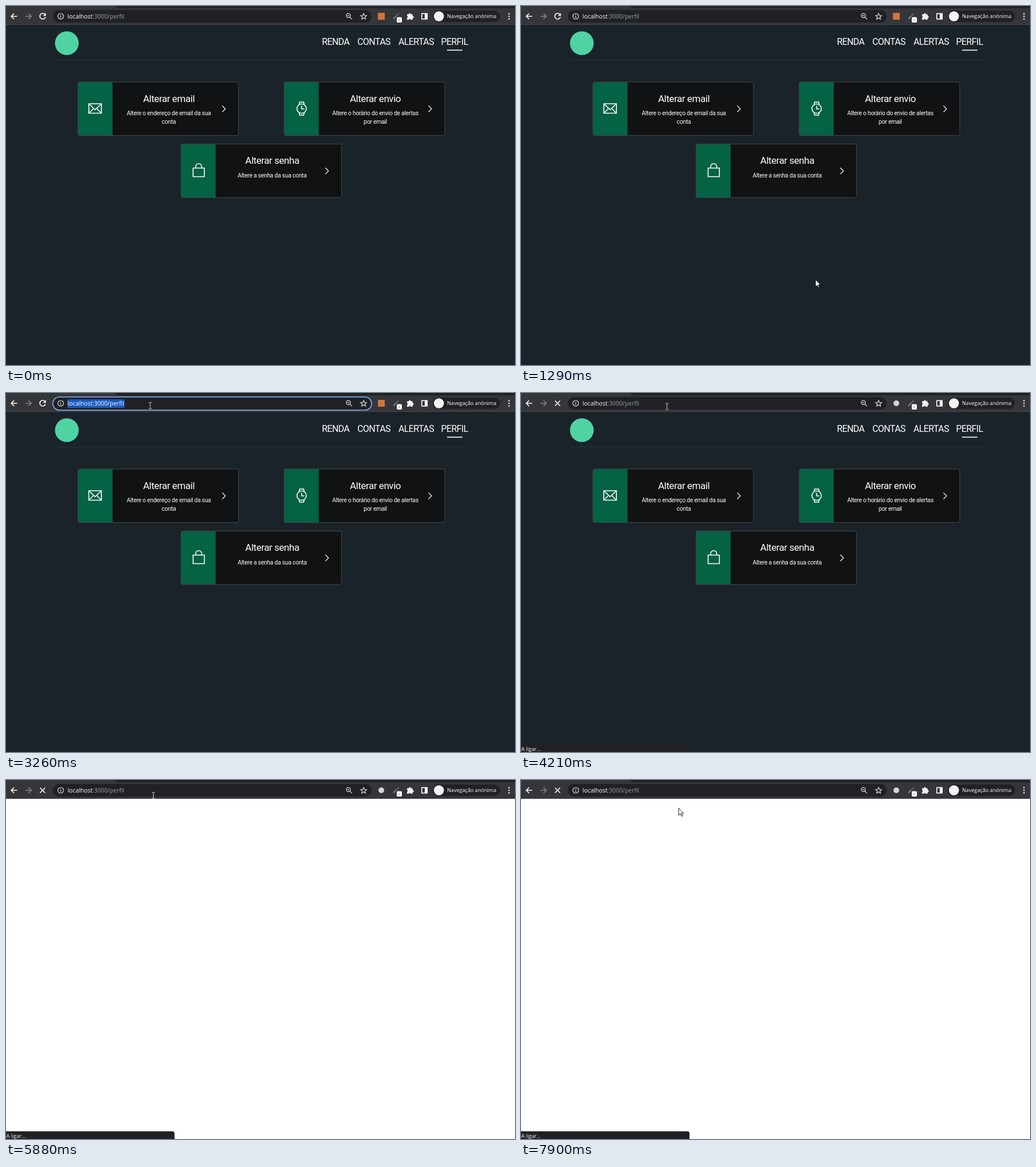
An HTML page for the animation above (8 s loop, 891 by 628 pixels).

```html
<!DOCTYPE html>
<html lang="pt">
<head>
<meta charset="utf-8">
<title>Perfil</title>
<style>
html, body { margin: 0; width: 100%; height: 100%; overflow: hidden; background: #1b232a; }
svg { display: block; width: 891px; height: 628px; }
.line { fill: none; stroke: #fff; stroke-width: 1.6; }
.tool { fill: none; stroke: #dfe1e5; stroke-width: 1.2; }
.ui { font-family: "Open Sans", "Noto Sans", sans-serif; fill: #fff; }
.url { font-size: 10.4px; }
.page { font-family: Roboto, sans-serif; fill: #fff; }
.nav { font-size: 16px; letter-spacing: -.6px; }
.head { font-size: 17px; letter-spacing: -.44px; text-anchor: middle; }
.desc { font-size: 10.4px; letter-spacing: -.27px; text-anchor: middle; }

/* Every animation shares the 8 s clock. */
.anim { animation: 8s step-end infinite; }
.idle { animation-name: idle; }
.loading { animation-name: loading; }
.ring { animation-name: ring; }
.selected { animation-name: selected; }
.ext-a { animation-name: extA; }
.ext-b { animation-name: extB; }
.blank { animation-name: blank; }
.pointer { animation-name: move; }
.arrow { animation-name: arrow; }
.beam { animation-name: beam; }
@keyframes idle { 0% { opacity: 1 } 46.75%, 100% { opacity: 0 } }
@keyframes loading { 0% { opacity: 0 } 46.75%, 100% { opacity: 1 } }
@keyframes ring { 0% { opacity: 0 } 29% { opacity: 1 } 46.75%, 100% { opacity: 0 } }
@keyframes selected { 0% { opacity: 0 } 30.625% { opacity: 1 } 46.75%, 100% { opacity: 0 } }
@keyframes extA { 0% { opacity: 1 } 52.625%, 100% { opacity: 0 } }
@keyframes extB { 0% { opacity: 0 } 52.625%, 100% { opacity: 1 } }
@keyframes blank { 0% { opacity: 0 } 60.25%, 100% { opacity: 1 } }
@keyframes arrow {
  0% { opacity: 0 } 7.625% { opacity: 1 } 20.5% { opacity: 0 }
  74.3125%, 100% { opacity: 1 }
}
@keyframes beam { 0% { opacity: 0 } 20.5% { opacity: 1 } 74.3125%, 100% { opacity: 0 } }
@keyframes move {
  0% { transform: translate(885px, 590px) }
  7.625% { transform: translate(885px, 590px); animation-timing-function: steps(10) }
  16.125% { transform: translate(515px, 478px) }
  17% { transform: translate(448px, 358px) }
  17.875% { transform: translate(395px, 250px) }
  18.75% { transform: translate(350px, 150px) }
  19.625% { transform: translate(318px, 75px) }
  20.5% { transform: translate(292px, 26px); animation-timing-function: steps(6) }
  25.75% { transform: translate(251.5px, 22px) }
  40.75% { transform: translate(252.5px, 22px) }
  41.625% { transform: translate(253.5px, 21.5px) }
  42.5% { transform: translate(254.5px, 21.5px) }
  45% { transform: translate(255.5px, 23.5px) }
  73.5% { transform: translate(258px, 27px) }
  74.3125% { transform: translate(261px, 29px) }
  75.125% { transform: translate(263px, 31px) }
  80.25% { transform: translate(264px, 32px) }
  81.125% { transform: translate(265px, 32px) }
  94.875% { transform: translate(267px, 34px); animation-timing-function: steps(4) }
  98.75%, 100% { transform: translate(275.5px, 48.5px) }
}
</style>
</head>
<body>
<svg viewBox="0 0 891 628">
  <defs>
    <g id="card">
      <rect x=".5" y=".5" width="281" height="93.5" rx="3" fill="#111214"/>
      <path d="M61 .5H3.5a3 3 0 0 0-3 3V91a3 3 0 0 0 3 3H61z" fill="#046245"/>
      <rect x=".5" y=".5" width="281" height="93.5" rx="3" fill="none" stroke="#44484b"/>
      <path class="line" style="stroke-width:1.2" d="M253 42l5.500 5.500-5.500 5.500"/>
    </g>
  </defs>

  <!-- page -->
  <rect width="891" height="628" fill="#1b232a"/>
  <circle cx="106.500" cy="65" r="20.800" fill="#4fd3a3"/>
  <path d="M86 94.500H808" stroke="#29323a"/>
  <g class="page nav">
    <text x="553" y="67.500">RENDA</text>
    <text x="615" y="67.500">CONTAS</text>
    <text x="687" y="67.500">ALERTAS</text>
    <text x="761.500" y="67.500">PERFIL</text>
  </g>
  <path d="M772 77.300H799" stroke="#fff" stroke-width="1.600"/>

  <g transform="translate(125.500 132.500)">
    <use href="#card"/>
    <path class="line" d="M19.500 38.500h22v16.500h-22zl8.500 8.200M41.500 38.500l-8.500 8.200M19.500 55l8.500-8.500 2.500 2.300 2.500-2.300 8.500 8.500"/>
    <g class="page">
      <text class="head" x="159.500" y="35">Alterar email</text>
      <text class="desc" x="159.500" y="58">Altere o endereço de email da sua</text>
      <text class="desc" x="159.500" y="73.500">conta</text>
    </g>
  </g>
  <g transform="translate(486.500 132.500)">
    <use href="#card"/>
    <circle class="line" cx="31" cy="47" r="8.200"/>
    <path class="line" d="M31 42v5.500h4.500M26.500 40l1-4.500h7l1 4.500M26.500 54l1 4.500h7l1-4.500"/>
    <g class="page">
      <text class="head" x="160" y="35">Alterar envio</text>
      <text class="desc" x="160" y="58">Altere o horário do envio de alertas</text>
      <text class="desc" x="160" y="73.500">por email</text>
    </g>
  </g>
  <g transform="translate(306 241)">
    <use href="#card"/>
    <path class="line" d="M21.500 42.500h19.800v15h-19.800zM26 42.500v-2.500a5.300 5.300 0 0 1 10.600 0v2.500"/>
    <g class="page">
      <text class="head" x="160" y="35">Alterar senha</text>
      <text class="desc" x="160" y="58.500">Altere a senha da sua conta</text>
    </g>
  </g>
  <rect class="anim blank" y="33" width="891" height="595" fill="#fff"/>

  <!-- status bubble -->
  <g class="anim loading">
    <path d="M0 614.500H291a4 4 0 0 1 4 4V628H0z" fill="#202124"/>
    <text class="ui" x=".5" y="626" font-size="9.200">A ligar...</text>
  </g>

  <!-- toolbar -->
  <rect width="891" height="33" fill="#35363a"/>
  <path d="M191 0H891V4H198q-4 0-7-4z" fill="#202124"/>
  <path d="M0 32.500H891" stroke="#494a4e"/>
  <path class="line" d="M19.500 18H9.500M14.200 13l-5 5 5 5"/>
  <path class="line" style="stroke:#85878a" d="M34 18h10M39.300 13l5 5-5 5"/>
  <g class="anim idle">
    <path class="line" d="M68 14.500a5 5 0 1 0 1 4.800"/>
    <path d="M69.800 12.300v5h-5z" fill="#fff"/>
  </g>
  <path class="line anim loading" d="M59.500 13.500l9 9M68.500 13.500l-9 9"/>

  <rect x="82" y="7" width="558" height="22" rx="11" fill="#202124"/>
  <circle class="tool" cx="95.800" cy="18" r="5"/>
  <path class="tool" d="M95.800 17v4M95.800 14.800v1.300"/>
  <text class="ui url" x="107.800" y="22">localhost<tspan fill="#9aa0a6">:3000/perfil</tspan></text>
  <g class="anim selected">
    <rect x="107.500" y="11" width="100" height="15" fill="#185abc"/>
    <text class="ui url" x="107.800" y="22">localhost:3000/perfil</text>
  </g>
  <rect class="anim ring" x="82" y="7" width="558" height="23" rx="11.500" fill="none" stroke="#8ab4f8" stroke-width="1.600"/>
  <circle class="tool" cx="599.300" cy="16.800" r="3.600"/>
  <path class="tool" d="M602 19.500l3.800 3.800M597.500 16.800h3.600"/>
  <path class="tool" d="M626 13l1.500 3.500 3.800.3-2.900 2.500.9 3.700-3.300-2-3.300 2 .9-3.700-2.900-2.500 3.800-.3z"/>

  <rect class="anim ext-a" x="651" y="12" width="12" height="12" fill="#d2753f"/>
  <circle class="anim ext-b" cx="657" cy="18" r="5" fill="#d5d6d8"/>
  <path d="M678 22.500l5-5" stroke="#85878a" stroke-width="2"/>
  <path d="M682.500 18l5-5" stroke="#55585c" stroke-width="3"/>
  <rect x="684" y="19.500" width="9" height="9.500" rx="2" fill="#fff"/>
  <path d="M687.500 24.500h2" stroke="#333"/>
  <path d="M702 14.500h3a1.900 1.900 0 0 1 3.800 0h3v3a1.900 1.900 0 0 1 0 3.800v2.700h-3.300a1.800 1.800 0 0 0-3.400 0h-3.100v-3.300a1.800 1.800 0 0 0 0-3.400z" fill="#f1f3f4"/>
  <rect x="727.800" y="13.300" width="9.500" height="9.500" class="line"/>
  <path d="M733 13h4.500v10h-4.500z" fill="#fff"/>
  <rect x="747" y="8" width="118" height="20" rx="10" fill="#202124"/>
  <circle cx="757.800" cy="18" r="8.800" fill="#f1f3f4"/>
  <text class="ui" x="772" y="21.300" font-size="9.100">Navegação anónima</text>
  <g fill="#f1f3f4">
    <circle cx="880.500" cy="13.500" r="1.300"/>
    <circle cx="880.500" cy="18" r="1.300"/>
    <circle cx="880.500" cy="22.500" r="1.300"/>
  </g>

  <!-- pointer -->
  <g class="anim pointer">
    <path class="anim arrow" d="M.5 .5V13.300L3.500 10.500 5.600 15 7.400 14.200 5.400 9.800H9.300z" fill="#fff" stroke="#000" stroke-width=".9"/>
    <path class="anim beam" d="M-2.500 -5.500h2M.5 -5.500h2M0 -5V5M-2.500 5.500h2M.5 5.500h2" fill="none" stroke="#e4e5e7"/>
  </g>
</svg>
</body>
</html>
```
